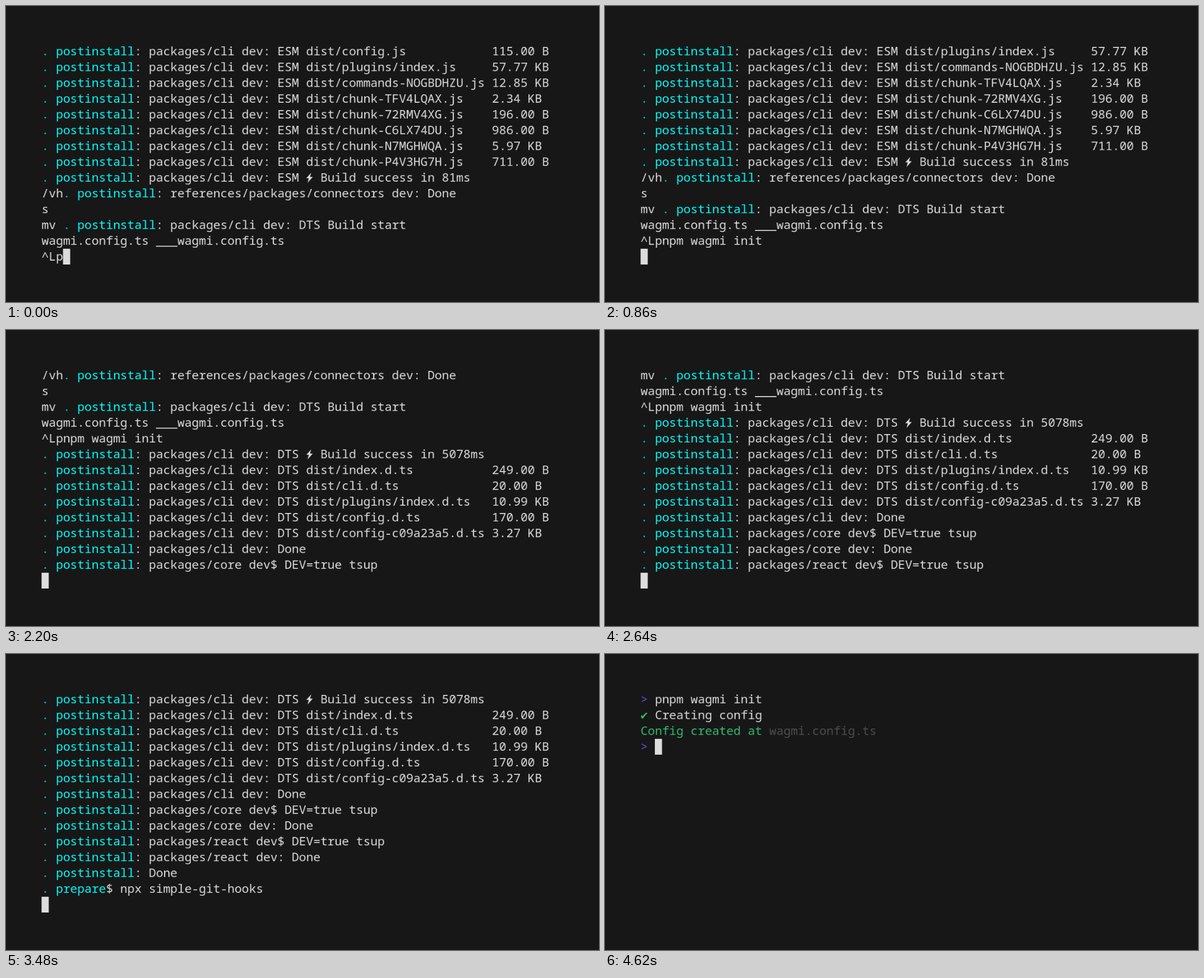
Recreate the animation shown at these times as an HTML page with a canvas. Size 1058 by 529 pixels, loop 4960 ms.

```html
<!DOCTYPE html>
<html lang="en">
<head>
<meta charset="utf-8">
<title>Terminal</title>
<style>
html, body { margin: 0; width: 100%; height: 100%; overflow: hidden; background: #171717; }
canvas { display: block; }
</style>
</head>
<body>
<canvas id="stage" width="1058" height="529"></canvas>
<script>
const LOOP = 4960;
// The terminal is drawn at 1200 x 600 and scaled down to the stage
const WIDTH = 1200, HEIGHT = 600, CELL = 14.465, LINE = 32, LEFT = 72, TOP = 76, BASE = 24;
const FONT = '500 24.4px "Noto Sans Mono", "DejaVu Sans Mono", monospace';
const INK = '#dddddd', CYAN = '#04d7d7', BRIGHT = '#00fefe', BLUE = '#5b56e0',
  GREEN = '#31bb71', GRAY = '#4d4d4d', BACK = '#171717';

const out = document.getElementById('stage').getContext('2d');
const screen = document.createElement('canvas');
screen.width = WIDTH;
screen.height = HEIGHT;
const ctx = screen.getContext('2d');
const bolt = new Path2D('M10.5 6L.5 17H5.6L3 26.5L13.5 14.5H8Z');

const post = s => '. postinstall: ' + s;
const cli = s => post('packages/cli dev: ' + s);
const built = kind => ([name, size]) => cli(`${kind} dist/${name}`).padEnd(63) + size;

const command = 'pnpm wagmi init';
const log = [
  ...[['config.js', '115.00 B'], ['plugins/index.js', '57.77 KB'],
    ['commands-NOGBDHZU.js', '12.85 KB'], ['chunk-TFV4LQAX.js', '2.34 KB'],
    ['chunk-72RMV4XG.js', '196.00 B'], ['chunk-C6LX74DU.js', '986.00 B'],
    ['chunk-N7MGHWQA.js', '5.97 KB'], ['chunk-P4V3HG7H.js', '711.00 B']].map(built('ESM')),
  cli('ESM ⚡ Build success in 81ms'),
  '/vh' + post('references/packages/connectors dev: Done'),
  's',
  'mv ' + cli('DTS Build start'),
  'wagmi.config.ts ___wagmi.config.ts',
  '^L' + command,
  cli('DTS ⚡ Build success in 5078ms'),
  ...[['index.d.ts', '249.00 B'], ['cli.d.ts', '20.00 B'],
    ['plugins/index.d.ts', '10.99 KB'], ['config.d.ts', '170.00 B'],
    ['config-c09a23a5.d.ts', '3.27 KB']].map(built('DTS')),
  cli('Done'),
  post('packages/core dev$ DEV=true tsup'),
  post('packages/core dev: Done'),
  post('packages/react dev$ DEV=true tsup'),
  post('packages/react dev: Done'),
  post('Done'),
  '. prepare$ npx simple-git-hooks'
];

// A row is a list of [text, colour] parts
function paint(line) {
  const m = line.match(/^(.*?)(\. )(postinstall|prepare)(.*)$/);
  return m ? [[m[1], INK], [m[2], CYAN], [m[3], BRIGHT], [m[4], INK]] : [[line, INK]];
}

const prompt = [['> ', BLUE]];
const asked = [...prompt, [command, INK]];
const step = (mark, color) => [[mark, color], [' Creating config', INK]];
const created = [['Config created at ', GREEN], ['wagmi.config.ts', GRAY]];

// Log scrolled so that `n` lines have been printed, last row free
const view = (n, last = '') => [...log.slice(n - 13, n), last].map(paint);
const bottom = [0, 13];

// [start time, rows, cursor as column and row, or null when hidden]
const states = [
  [860, view(14), bottom],
  [1300, view(14), null],
  [1800, view(14), bottom],
  [2180, view(21), bottom],
  [2200, view(22), bottom],
  [2620, view(22, log[22]), bottom],
  [2640, view(24), bottom],
  [2980, view(25), bottom],
  [3020, view(27), bottom],
  [3500, [prompt], [2, 0]],
  [3520, [asked], [0, 1]],
  [4120, [asked], null],
  [4360, [asked, step('⠋', CYAN)], null],
  [4600, [asked, step('✔', GREEN)], null],
  [4620, [asked, step('✔', GREEN), created, prompt], [2, 3]]
];

function typing(t) {
  let count = 1;
  while (count < command.length && t >= Math.round((40 + (count - 1) * 440 / 13) / 20) * 20) count++;
  return [0, view(13, '^L' + command.slice(0, count)), [2 + count, 13]];
}

function drawRow(parts, y) {
  let x = LEFT;
  for (const [text, color] of parts) {
    ctx.fillStyle = color;
    for (const char of text) {
      if (char === '⚡') {
        ctx.translate(x, y);
        ctx.fill(bolt);
        ctx.translate(-x, -y);
      } else if (char !== ' ') {
        ctx.fillText(char, x, y + BASE);
      }
      x += CELL;
    }
  }
}

let last;
function draw() {
  const t = performance.now() % LOOP;
  const [, rows, cursor] = states.findLast(s => t >= s[0]) || typing(t);
  if (rows !== last) {
    last = rows;
    ctx.fillStyle = BACK;
    ctx.fillRect(0, 0, WIDTH, HEIGHT);
    ctx.font = FONT;
    rows.forEach((parts, i) => drawRow(parts, TOP + i * LINE));
    if (cursor) {
      ctx.fillStyle = INK;
      ctx.fillRect(LEFT + cursor[0] * CELL, TOP + cursor[1] * LINE, CELL, LINE);
    }
    out.imageSmoothingQuality = 'high';
    out.drawImage(screen, 0, 0, out.canvas.width, out.canvas.height);
  }
  requestAnimationFrame(draw);
}
draw();
</script>
</body>
</html>
```
